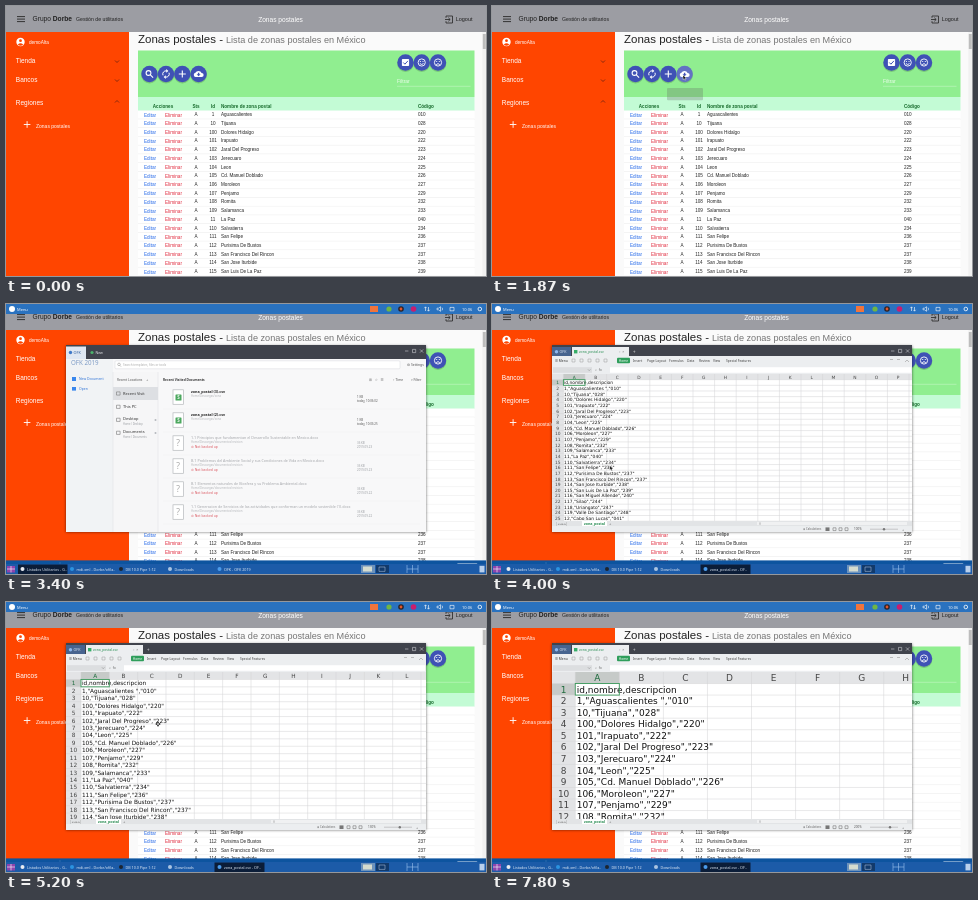
These frames come from a looping animation (480x270 px, 7.99 s). An HTML page:

```html
<!DOCTYPE html>
<html lang="es">
<head>
<meta charset="utf-8">
<title>Zonas postales</title>
<style>
html, body { margin: 0; width: 100%; height: 100%; overflow: hidden; background: #fafafa; }
svg { display: block; width: 100vw; height: 100vh; font-family: "Liberation Sans", Arial, sans-serif; }
text { white-space: pre; }
.ui { font-family: "Noto Sans", "Open Sans", sans-serif; }
.cells { font-family: "DejaVu Sans", sans-serif; }
</style>
</head>
<body>
<svg id="stage" viewBox="0 0 480 270" preserveAspectRatio="none"></svg>
<script>
const LOOP = 7990;
const zones = `1|Aguascalientes |010
10|Tijuana|028
100|Dolores Hidalgo|220
101|Irapuato|222
102|Jaral Del Progreso|223
103|Jerecuaro|224
104|Leon|225
105|Cd. Manuel Doblado|226
106|Moroleon|227
107|Penjamo|229
108|Romita|232
109|Salamanca|233
11|La Paz|040
110|Salvatierra|234
111|San Felipe|236
112|Purisima De Bustos|237
113|San Francisco Del Rincon|237
114|San Jose Iturbide|238
115|San Luis De La Paz|239
116|San Miguel Allende|240
117|Silao|244
118|Uriangato|247
119|Valle De Santiago|248
12|Cabo San Lucas|041`.split('\n').map(line => line.split('|'));

// y is the vertical middle of the line
const text = (x, y, str, size, fill = '#222', attrs = '') =>
  `<text x="${x}" y="${y + size * 0.36}" font-size="${size}" fill="${fill}" ${attrs}>${str}</text>`;
const mid = (x, y, str, size, fill, attrs = '') => text(x, y, str, size, fill, `text-anchor="middle" ${attrs}`);
const rect = (x, y, w, h, fill, attrs = '') =>
  `<rect x="${x}" y="${y}" width="${w}" height="${h}" fill="${fill}" ${attrs}/>`;
const circle = (x, y, r, fill, attrs = '') => `<circle cx="${x}" cy="${y}" r="${r}" fill="${fill}" ${attrs}/>`;
const line = (d, stroke, width = 0.8, attrs = '') =>
  `<path d="${d}" fill="none" stroke="${stroke}" stroke-width="${width}" ${attrs}/>`;
const group = (id, body, attrs = '') => `<g id="${id}" ${attrs}>${body}</g>`;
const at = (x, y, body) => `<g transform="translate(${x} ${y})">${body}</g>`;
const BOLD = 'font-weight="700"';

const face = mouth => line('M-3.6 0a3.6 3.6 0 1 0 7.2 0a3.6 3.6 0 1 0-7.2 0' + mouth, '#fff', 0.9) +
  circle(-1.3, -1, 0.6, '#fff') + circle(1.3, -1, 0.6, '#fff');
const icons = {
  search: line('M1.4-1A2.4 2.4 0 1 1-3.4-1A2.4 2.4 0 1 1 1.4-1M.8 .8L3.6 3.6', '#fff', 1.1),
  refresh: line('M-3 1.3A3.2 3.2 0 0 1 .6-3.1M3-1.3A3.2 3.2 0 0 1-.6 3.1', '#fff', 1) +
    '<path d="M.2-4.9L2.4-3.1L.2-1.3ZM-.2 4.9L-2.4 3.1L-.2 1.3Z" fill="#fff"/>',
  plus: line('M-3.5 0H3.5M0-3.5V3.5', '#fff', 1.1),
  cloud: '<path d="M-3 3.1A2.2 2.2 0 0 1-3.2-1.2A3.4 3.4 0 0 1 3-1A2 2 0 0 1 3 3.1Z" fill="#fff"/>' +
    '<path d="M-.7-1.2H.7V.3H2L0 2.3L-2 .3H-.7Z" fill="#3f51b5"/>',
  check: rect(-3.6, -3.6, 7.2, 7.2, '#fff', 'rx=".8"') + line('M-2.2 0L-.6 1.7L2.4-1.6', '#3f51b5', 1),
  smile: face('M-1.8 1Q0 3 1.8 1'),
  sad: face('M-1.8 2.2Q0 0 1.8 2.2')
};
const button = (x, y, icon, id = '') => at(x, y,
  circle(0, 1.2, 8.3, '#000', 'opacity=".16"') + circle(0, 0, 8.2, '#3f51b5', id && `id="${id}"`) + icons[icon]);

function pageMarkup() {
  const chevron = (y, dir) => line(`M109 ${y - dir}l2 ${2 * dir}l2 ${-2 * dir}`, '#7d2810', 0.9);
  const header = rect(0, 0, 480, 26, '#9c9da3') +
    line('M11 10.6h8M11 13.1h8M11 15.6h8', '#333', 1) +
    text(26.5, 13, `Grupo <tspan ${BOLD}>Dorbe</tspan>`, 6.65, '#222') +
    text(70, 13.2, 'Gestión de utilitarios', 5.2, '#222') +
    mid(274.5, 13.2, 'Zonas postales', 6.6, '#fff') +
    line('M440 11.8V10h6.5v7H440v-1.8M439 13.5h5M442.3 11.7l1.9 1.8l-1.9 1.8', '#333', 0.9) +
    text(449.7, 13.3, 'Logout', 5.5, '#222');
  const side = rect(0, 26, 123, 244, '#ff4500') +
    circle(14.5, 36, 4.2, '#fff') + circle(14.5, 34.7, 1.4, '#ff4500') +
    '<path d="M11.8 38.4q2.7-2.5 5.4 0q-2.7 2.6-5.4 0" fill="#ff4500"/>' +
    text(23, 36.2, 'demoAlta', 4.7, '#fff') +
    text(9.8, 54.5, 'Tienda', 6.5, '#fff') + chevron(55.5, 1) +
    text(9.8, 74, 'Bancos', 6.5, '#fff') + chevron(74.5, 1) +
    text(9.8, 97, 'Regiones', 6.5, '#fff') + chevron(95.5, -1) +
    line('M17.8 118.5h6.6M21.1 115.2v6.6', '#fff', 0.9) +
    text(30, 119.8, 'Zonas postales', 5, '#fff');
  const head = '#176b2c';
  const table = rect(132, 91, 336.5, 13.8, '#c3fbd5') +
    mid(157, 100.5, 'Acciones', 4.6, head, BOLD) + mid(190, 100.5, 'Sts', 4.6, head, BOLD) +
    mid(207, 100.5, 'Id', 4.6, head, BOLD) + text(215, 100.5, 'Nombre de zona postal', 4.6, head, BOLD) +
    text(412, 100.5, 'Código', 4.6, head, BOLD) +
    zones.slice(0, 19).map(([id, name, code], i) => {
      const y = 108.6 + i * 8.72;
      return rect(132, y - 4, 336.5, 8.72, '#fff') + line(`M132 ${y + 4.6}h336.5`, '#dedede', 0.5) +
        mid(144, y + 0.3, 'Editar', 4.7, '#2468e8') + mid(167.5, y + 0.3, 'Eliminar', 4.7, '#e0283c') +
        mid(190, y, 'A', 4.6) + mid(207, y, id, 4.6) + text(215, y, name, 4.6) + text(412, y, code, 4.6);
    }).join('');
  return rect(0, 0, 480, 270, '#fafafa') + header + side +
    text(132, 33.2, 'Zonas postales -', 11.5, '#222') +
    text(220, 33.8, 'Lista de zonas postales en México', 9.15, '#757575') +
    rect(132, 44.5, 336.5, 46.5, '#90ee90') +
    button(143.5, 68, 'search') + button(160, 68, 'refresh') + button(176.3, 68, 'plus') +
    button(192.6, 68, 'cloud', 'download') +
    button(399.5, 56.5, 'check') + button(415.7, 56.5, 'smile') + button(432, 56.5, 'sad') +
    text(391, 75.3, 'Filtrar', 5, '#eefcee') + line('M391 80.3h73.5', '#c2f4c2', 0.6) + table +
    rect(476.4, 26, 3.6, 244, '#f1f1f1') + rect(476.8, 28, 3, 15, '#bdbdbd') +
    group('tooltip', rect(175, 82, 36, 12.2, '#616161', 'rx="1"'));
}

function downloadBarMarkup() {
  return rect(0, 256.4, 480, 13.6, '#0d549f') +
    rect(4, 261, 3.6, 5, '#dfe8f2') + text(11, 263.4, 'zona_postal.csv', 4, '#fff') +
    line('M47.5 264l1.5-1.5l1.5 1.5', '#fff', 0.6) + line('M54 258v10', '#4d82b8', 0.5) +
    rect(451, 259.4, 20.5, 7.6, '#dbe6f2', 'rx="1"') + mid(461.2, 263.2, 'Show all', 4, '#123') +
    line('M474.6 261.8l2.6 2.6m0-2.6l-2.6 2.6', '#fff', 0.6);
}

function desktopMarkup() {
  const task = (x, label, color) => circle(x + 2, 265, 2, color) + text(x + 6.5, 265.2, label, 3.7, '#dfe9f5');
  const top = rect(0, 0, 480, 10, '#2a72bf') + circle(6, 5, 3, '#fff') + text(11, 5.2, 'Menu', 4, '#fff') +
    rect(364, 2, 8, 6, '#f0743c') + circle(383, 5, 2.6, '#6fb544') + circle(395, 5, 2.8, '#2b2327') +
    circle(395, 5, 1.4, '#e0562c') + circle(407.5, 5, 2.8, '#c81e6e') +
    line('M419.5 7V3M418.3 4.2l1.2-1.4l1.2 1.4M422.5 3v4M421.3 5.8l1.2 1.4l1.2-1.4', '#fff', 0.6) +
    line('M431 4.2h1.5l2-1.5v4.6l-2-1.5h-1.5zM436 3.6q1.2 1.4 0 2.8M444 3.4h4v3.4h-4z', '#fff', 0.6) +
    text(456, 5.2, '10:06', 4, '#fff') + line('M472 5a1.8 1.8 0 1 0 3.6 0a1.8 1.8 0 1 0-3.6 0', '#fff', 0.8);
  const bottom = rect(0, 260, 480, 10, '#1c5ba8') + rect(1, 262, 8, 6.5, '#8e44ad') +
    line('M1 265h8M5 262v6.5', '#fff', 0.6) +
    group('browserTask', rect(12, 260.5, 49.5, 9.5, '#0b1d38')) +
    task(14.5, 'Listados Utilitarios - G..', '#e8ecf2') + task(64, 'mdi.xml - Dorbe/ofila..', '#2b93e0') +
    task(113, 'DB 10.0 Pipe 1:12', '#1d2530') + task(162, 'Downloads', '#aac4e2') +
    group('launcherTask', task(211.5, 'OFK - OFK 2019', '#4b9bea')) +
    group('sheetTask', rect(208.5, 260.5, 50, 9.5, '#0b1d38') + task(211.5, 'zona_postal.csv - OF..', '#4b9bea')) +
    rect(355, 261, 14, 8, '#6e93bb') + rect(357, 262.5, 9, 5, '#d5dccf') + rect(370, 261, 13, 8, '#123a6b') +
    line('M373 263h6v4.4h-6z', '#b9cbe0', 0.5) +
    line('M401 261v8M401 265h11M406.5 261v8M412 261v8', '#9cc3ee', 0.6) +
    rect(473.5, 261.8, 5, 6.6, '#b9d0ec');
  return top + bottom;
}

const frameShadow = rect(60, 42, 360, 186, '#000', 'filter="url(#blur)" opacity=".6"');
const titleBar = height => rect(60, 41, 360, height, '#40434c') +
  line('M399 47h3.4M406.5 45.4h3.2v3.2h-3.2zM414 45.4l3.2 3.2m0-3.2l-3.2 3.2', '#c9ccd1', 0.6);

function launcherMarkup() {
  const gray = '#9b9ea3';
  const place = (y, label, note) => line(`M110.5 ${y - 1.8}h3.6v3.2h-3.6z`, '#777', 0.6) +
    text(117, y - (note ? 1 : 0), label, 4, '#333') +
    (note ? text(117, y + 4, note, 2.6, gray) + circle(149.5, y, 1, '#b5b8bd') : '');
  const doc = (y, title, date, known) => rect(167, y - 1.2, 10.5, 14.5, '#fff', 'stroke="#b5b8bc" stroke-width=".7"') +
    (known ? rect(169.5, y + 3.5, 6, 6, '#4ca85f', 'rx=".6"') + mid(172.4, y + 6.6, 'S', 4.5, '#fff', BOLD)
      : mid(172.2, y + 6, '?', 8.5, '#aaa')) +
    text(185, y + 0.3, title, 3.7, known ? '#222' : '#a4a6aa', known ? BOLD : '') +
    text(185, y + 4.8, `Home/Descargas/${known ? 'zona' : 'documentos/revision'}`, 2.8, '#b4b6ba') +
    (known ? '' : text(185, y + 9.6, '⊘ Not backed up', 3.4, '#dc5f68')) +
    text(351, y + 5.5, known ? '1 KB' : '36 KB', 2.9, known ? '#555' : gray) +
    text(351, y + 9.8, known ? `today, ${date}` : date, 2.9, known ? '#555' : gray) +
    line(`M157 ${y + 18}h257`, '#ebebed', 0.4);
  return frameShadow + rect(60, 41, 360, 187, '#f8f8f9') + titleBar(14) +
    rect(60, 42.5, 20, 12.5, '#dfe7f2') + circle(64.5, 48.5, 1.7, '#3f79c8') + text(67.5, 48.6, 'OFK', 3.8, '#2f5f9f') +
    circle(86, 48.5, 1.6, '#4bb36b') + text(89.5, 48.6, 'New', 3.5, '#e3e5e8') +
    rect(60, 55, 47, 173, '#f1f3f5') + rect(107, 68, 45, 160, '#f6f6f7') +
    line('M107 68V228M152 68V228', '#dcdee1', 0.5) +
    text(65, 59, 'OFK 2019', 6.2, '#7f9cc6') +
    rect(109, 56.8, 285, 8, '#fff', 'rx="1" stroke="#d7d9dd" stroke-width=".5"') +
    line('M114.3 60.4a1.3 1.3 0 1 1-2.6 0a1.3 1.3 0 1 1 2.6 0m-.4 1l1.2 1.3', '#888', 0.5) +
    text(117, 60.8, 'Search templates, files or tools', 3, '#aaa') + text(401, 60.8, '⚙ Settings', 3.4, '#555') +
    rect(66, 73, 4, 4, '#3987ed') + text(73, 75.2, 'New Document', 3.4, '#3477d8') +
    rect(66, 83, 4, 3.6, '#3987ed') + text(73, 85, 'Open', 3.4, '#3477d8') +
    text(111, 76, 'Recent Locations', 3.2, '#555') + text(140, 76, '+', 4, '#777') +
    rect(107, 83, 45, 13, '#dddfe3') + place(89.7, 'Recent Visit') + place(103, 'This PC') +
    place(116, 'Desktop', 'Home / Desktop') + place(129, 'Documents', 'Home / Documents') +
    text(157, 76.2, 'Recent Visited Documents', 3.2, '#333', BOLD) +
    text(363, 76.2, '⊞   ☆   ☰', 3.5, '#666') + text(387, 76.2, '↑ Time', 3.3, '#555') + text(405, 76.2, '▿ Filter', 3.3, '#555') +
    doc(87, 'zona_postal (3).csv', '10:06:02', true) +
    doc(110, 'zona_postal (2).csv', '10:03:25', true) +
    doc(133, '1.1 Principios que fundamentan el Desarrollo Sustentable en Mexico.docx', '2019-09-23') +
    doc(156, 'B.1 Problemas del Ambiente Social y sus Condiciones de Vida en Mexico.docx', '2019-09-23') +
    doc(179, 'B.1 Elementos naturales de Biosfera y su Problema Ambiental.docx', '2019-09-22') +
    doc(202, '1.1 Generacion de Servicios de las actividades que conforman un modelo sostenible (1).docx', '2019-09-22');
}

// The whole grid, headings included, scales from its top left corner.
function gridMarkup(scale) {
  const x0 = 60, y0 = 70, rowH = 5.66 * scale, colW = 21.6 * scale, headW = 11.4 * scale;
  const left = x0 + headW, top = y0 + rowH, size = 4.42 * scale;
  const rows = Math.ceil(148 / rowH), cols = Math.ceil(360 / colW);
  const lines = [], labels = [];
  const label = (x, y, str, first) => labels.push(mid(x, y + 0.2, str, size, first ? '#1d6b3d' : '#444', 'class="cells"'));
  for (let c = 0; c < cols; c++) {
    const x = left + c * colW;
    lines.push(`M${x} ${y0}V218`);
    label(x + colW / 2, y0 + rowH / 2, String.fromCharCode(65 + c), c === 0);
  }
  for (let r = 0; r < rows; r++) {
    const y = top + r * rowH, zone = zones[r - 1];
    lines.push(`M${x0} ${y}H420`);
    label(x0 + headW / 2, y + rowH / 2, r + 1, r === 0);
    const content = r ? zone && `${zone[0]},"${zone[1]}","${zone[2]}"` : 'id,nombre,descripcion';
    if (content) labels.push(text(left + 0.7 * scale, y + rowH / 2 + 0.2, content, size, '#111', 'class="cells"'));
  }
  return rect(x0, y0, 360, 148, '#fff') + rect(x0, y0, 360, rowH, '#e3e4e6') + rect(x0, y0, headW, 148, '#e3e4e6') +
    rect(left, y0, colW, rowH, '#c6cac8') + rect(x0, top, headW, rowH, '#c6cac8') +
    line(lines.join(''), '#d2d3d5', 0.5) + labels.join('') +
    rect(left, top, colW, rowH, 'none', 'stroke="#3c9a5c" stroke-width=".9"');
}

function sheetMarkup() {
  const menus = [[141, 'Insert'], [155, 'Page Layout'], [177, 'Formulas'], [195, 'Data'], [207, 'Review'],
    [221, 'View'], [234, 'Special Features']];
  return frameShadow + rect(60, 41, 360, 187, '#f1f2f3') + titleBar(11) +
    rect(60, 43, 19, 9, '#47648f') + circle(64.5, 47.8, 1.7, '#8db7ee') + text(67.5, 48, 'OFK', 3.6, '#dfe8f5') +
    rect(80, 43, 57, 9, '#eceef0') + rect(82, 46, 3.4, 3.4, '#36ad68') + text(87, 48, 'zona_postal.csv', 3.4, '#2b8f55') +
    text(127, 48, '▫  ×', 3.6, '#777') + text(141, 48, '+', 4.5, '#ddd') +
    rect(60, 52, 360, 10, '#eceef0') + text(63, 56.6, '☰ Menu', 3.3, '#333') +
    line('M80 55h3v3h-3zM88 55h3v3h-3zM96 55h3v3h-3zM104 55h3v3h-3zM112 55h3v3h-3z', '#999', 0.5) +
    rect(125, 53.7, 13, 5.6, '#2f9e5b', 'rx="1"') + mid(131.5, 56.6, 'Home', 3.3, '#fff') +
    menus.map(([x, label]) => text(x, 56.6, label, 3.3, '#444')).join('') +
    line('M398 55.5h3M405 55.5h3M413 58l2-2l2 2', '#888', 0.5) +
    rect(60, 62, 360, 8, '#eceef0') + rect(61, 63.2, 39, 5.6, '#dcdee0') + line('M96 65.4l1.2 1.2l1.2-1.2', '#777', 0.5) +
    text(103, 66, '⌕  fx', 3.5, '#666') + rect(118, 63.2, 301, 5.6, '#fff') +
    '<g clip-path="url(#gridArea)">' + group('grid', '') + group('gridPatch', '', 'clip-path="url(#patchArea)"') + '</g>' +
    rect(60, 217, 360, 5.3, '#e2e4e6') + text(64, 219.7, '|◂ ◂ ▸ ▸|', 3, '#777') +
    rect(90, 217, 25, 5.3, '#fff') + mid(102.5, 219.6, 'zona_postal', 3.6, '#258a50', BOLD) + text(117, 219.6, '+', 4, '#777') +
    rect(265, 218, 150, 3, '#f0f1f2') + line('M268 218.4v2.4', '#888', 0.6) +
    rect(60, 222.3, 360, 5.7, '#eceef0') + text(311, 225.2, '⊞ Calculations', 2.7, '#666') +
    rect(333.5, 223.4, 4, 3.6, '#777') +
    line('M341 223.8h3v2.8h-3zM347 223.8h3v2.8h-3zM353 223.8h3v2.8h-3z', '#777', 0.6) +
    text(362, 225.2, '100%', 3, '#555', 'id="zoomLabel"') + line('M378 225.2h28', '#aaa', 0.6) +
    circle(392, 225.2, 1.2, '#777', 'id="zoomKnob"') + text(410, 225.2, '+', 3.8, '#777');
}

const stage = document.getElementById('stage');
stage.innerHTML = `<defs><clipPath id="gridArea">${rect(60, 70, 360, 147.2)}</clipPath>
  <clipPath id="patchArea">${rect(60, 70, 85, 39)}</clipPath>
  <filter id="blur" x="-10%" y="-10%" width="120%" height="120%"><feGaussianBlur stdDeviation="1.8"/></filter></defs>` +
  pageMarkup() + group('downloadBar', downloadBarMarkup()) +
  group('desktop', desktopMarkup(), 'class="ui"') +
  group('launcher', launcherMarkup(), 'class="ui"') + group('sheet', sheetMarkup(), 'class="ui"') +
  group('arrow', '<path d="M0 0V4.6L1.1 3.6L1.9 5.3L2.7 4.9L2 3.3H3.4Z" fill="#111" stroke="#fff" stroke-width=".4"/>') +
  group('cross', line('M-2.2 0H2.2M0-2.2V2.2', '#111', 1.9) + line('M-1.6 0H1.6M0-1.6V1.6', '#fff', 0.8));

const $ = id => document.getElementById(id);
const show = (id, on) => $(id).setAttribute('visibility', on ? 'visible' : 'hidden');
const between = (t, a, b) => t >= a && t < b;
const clamp = v => Math.max(0, Math.min(1, v));

// time, x, y
const pointerPath = [[400, 236, 168], [1400, 191, 69], [2050, 191, 69], [2600, 114.5, 217.5], [2950, 30, 263],
  [3500, 30, 263], [4270, 152, 122], [5870, 152, 122], [6530, 110, 264]];
function pointerAt(t) {
  const i = pointerPath.findIndex(p => p[0] > t);
  if (i < 1) return pointerPath[i ? pointerPath.length - 1 : 0].slice(1);
  const [t0, x0, y0] = pointerPath[i - 1], [t1, x1, y1] = pointerPath[i];
  const k = (t - t0) / (t1 - t0), e = k * k * (3 - 2 * k);
  return [x0 + (x1 - x0) * e, y0 + (y1 - y0) * e];
}

const zoomStep = t => t < 4730 ? 0 : t < 5070 ? 1 : Math.min(10, 2 + Math.floor((t - 5070) / 75));
const scaleOf = step => 1 + step * 0.104;
let drawnStep = -1;

$('gridPatch').innerHTML = gridMarkup(scaleOf(1));

function render(t) {
  const desktop = t >= 2930, sheet = t >= 3870, launcher = between(t, 3130, 3870);
  show('downloadBar', t >= 2270);
  show('desktop', desktop);
  show('launcher', launcher);
  show('sheet', sheet);
  show('browserTask', desktop && !sheet);
  show('launcherTask', launcher);
  show('sheetTask', sheet);
  $('download').setAttribute('fill', between(t, 1400, 2130) ? '#6372c3' : '#3f51b5');
  $('tooltip').setAttribute('opacity', 0.28 * clamp((t - 1730) / 130) * clamp((2130 - t) / 100));

  const step = zoomStep(t);
  if (step !== drawnStep) {
    drawnStep = step;
    $('grid').innerHTML = gridMarkup(scaleOf(step));
    $('zoomLabel').textContent = `${100 + step * 10}%`;
    $('zoomKnob').setAttribute('cx', 392 + step * 0.6);
  }
  show('gridPatch', between(t, 4640, 4730));

  const [x, y] = pointerAt(t);
  const overCells = between(t, 4200, 6100);
  for (const id of ['arrow', 'cross']) $(id).setAttribute('transform', `translate(${x} ${y})`);
  show('arrow', between(t, 400, 6530) && !overCells && !between(t, 3000, 3530));
  show('cross', overCells);
}

function tick() {
  render(performance.now() % LOOP);
  requestAnimationFrame(tick);
}
tick();
</script>
</body>
</html>
```
